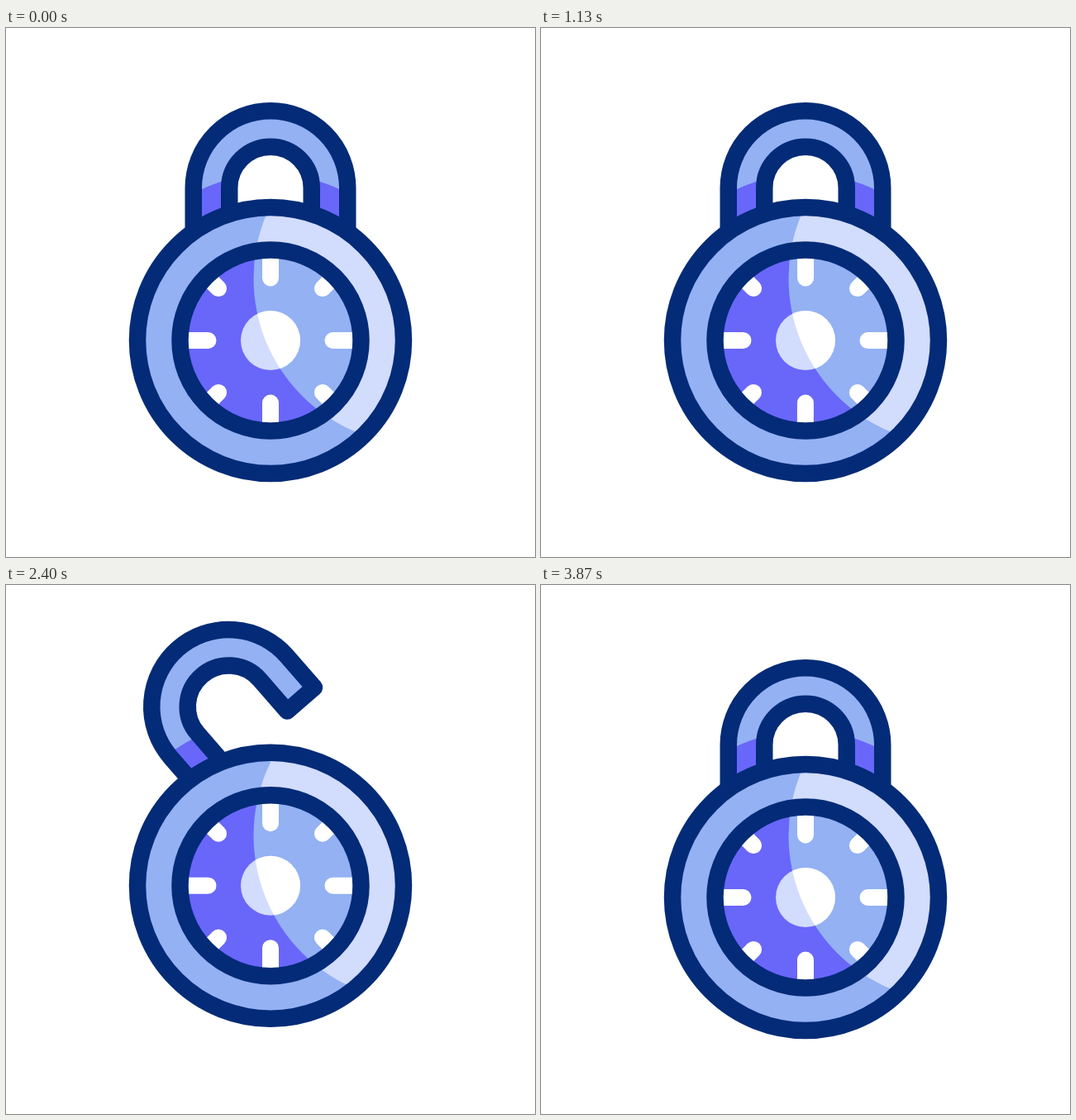
Animation of 640 by 640 pixels, one loop 4000 ms. Source, as an HTML page with a canvas:

```html
<!DOCTYPE html>
<html lang="en">
<head>
<meta charset="utf-8">
<title>Combination lock</title>
<style>
html, body { margin: 0; width: 100%; height: 100%; overflow: hidden; background: #fff; }
canvas { display: block; width: 100vmin; height: 100vmin; }
</style>
</head>
<body>
<canvas width="640" height="640"></canvas>
<script>
const ctx = document.querySelector('canvas').getContext('2d');
const NAVY = '#032b77', BLUE = '#93b1f3', PALE = '#d2dcfd', PURPLE = '#6966fa', WHITE = '#fff';
const FPS = 30, FRAMES = 120, LINE = 20.5, CX = 320, CY = 378, RAD = Math.PI / 180;

// Keys are [frame, value], eased in and out between neighbours.
const lift = [[0, 0], [7, 17], [14, -18], [21, 0], [56, 0], [63, 17], [70, -18], [77, .5], [97, .5], [112, 0]];
const spin = [[0, 0], [33.8, -360], [63, 0]];
const swing = [[63, 0], [76, -53], [83, -46], [97, -46], [110, 2], [116, 0]];

function at(keys, f) {
  const i = keys.findIndex(k => k[0] > f);
  if (i === 0) return keys[0][1];
  if (i < 0) return keys[keys.length - 1][1];
  const [f0, a] = keys[i - 1], [f1, b] = keys[i];
  const u = (f - f0) / (f1 - f0);
  return a + (b - a) * u * u * (3 - 2 * u);
}

function circle(x, y, r) {
  const p = new Path2D();
  p.arc(x, y, r, 0, 7);
  return p;
}

function fill(path, color) {
  ctx.fillStyle = color;
  ctx.fill(path);
}

function outline(path) {
  ctx.strokeStyle = NAVY;
  ctx.lineWidth = LINE;
  ctx.stroke(path);
}

const shackle = new Path2D();
shackle.arc(CX, 193.5, 93.25, Math.PI, 0);
shackle.lineTo(413.25, 244);
shackle.lineTo(369.75, 244);
shackle.arc(CX, 193.5, 49.75, 0, Math.PI, true);
shackle.lineTo(270.25, 244);
shackle.lineTo(226.75, 244);
shackle.closePath();

const shade = circle(CX, CY, 201);
const body = circle(CX, CY, 161);
const dial = circle(CX, CY, 109.5);
const knob = circle(CX, CY, 36);

function turn(x, y, deg) {
  ctx.translate(x, y);
  ctx.rotate(deg * RAD);
  ctx.translate(-x, -y);
}

function drawShackle(deg) {
  ctx.save();
  turn(252, 245, deg);
  fill(shackle, BLUE);
  ctx.save();
  ctx.clip(shackle);
  turn(252, 245, -deg);
  fill(shade, PURPLE);
  ctx.restore();
  outline(shackle);
  ctx.restore();
}

// The gleam stays fixed on the stage while the lock bounces.
function twoTone(path, y, dark, light) {
  fill(path, dark);
  ctx.save();
  ctx.clip(path);
  fill(circle(500.5, 303 - y, 201), light);
  ctx.restore();
}

function drawTicks(deg) {
  ctx.save();
  ctx.clip(dial);
  turn(CX, CY, deg);
  ctx.strokeStyle = WHITE;
  ctx.lineWidth = 20;
  ctx.beginPath();
  for (let i = 0; i < 8; i++) {
    const c = Math.cos(i * 45 * RAD), s = Math.sin(i * 45 * RAD), r = i % 2 ? 89 : 75.5;
    ctx.moveTo(CX + c * r, CY + s * r);
    ctx.lineTo(CX + c * 115, CY + s * 115);
  }
  ctx.stroke();
  ctx.restore();
}

function draw(now) {
  const f = Math.floor((now + 4) * FPS / 1000) % FRAMES;
  const y = at(lift, f);
  ctx.fillStyle = WHITE;
  ctx.fillRect(0, 0, 640, 640);
  ctx.lineJoin = ctx.lineCap = 'round';
  ctx.save();
  ctx.translate(0, y);
  drawShackle(at(swing, f));
  twoTone(body, y, BLUE, PALE);
  outline(body);
  twoTone(dial, y, PURPLE, BLUE);
  drawTicks(at(spin, f));
  outline(dial);
  twoTone(knob, y, PALE, WHITE);
  ctx.restore();
}

const start = performance.now();
function loop() {
  draw(performance.now() - start);
  requestAnimationFrame(loop);
}
loop();
</script>
</body>
</html>
```
